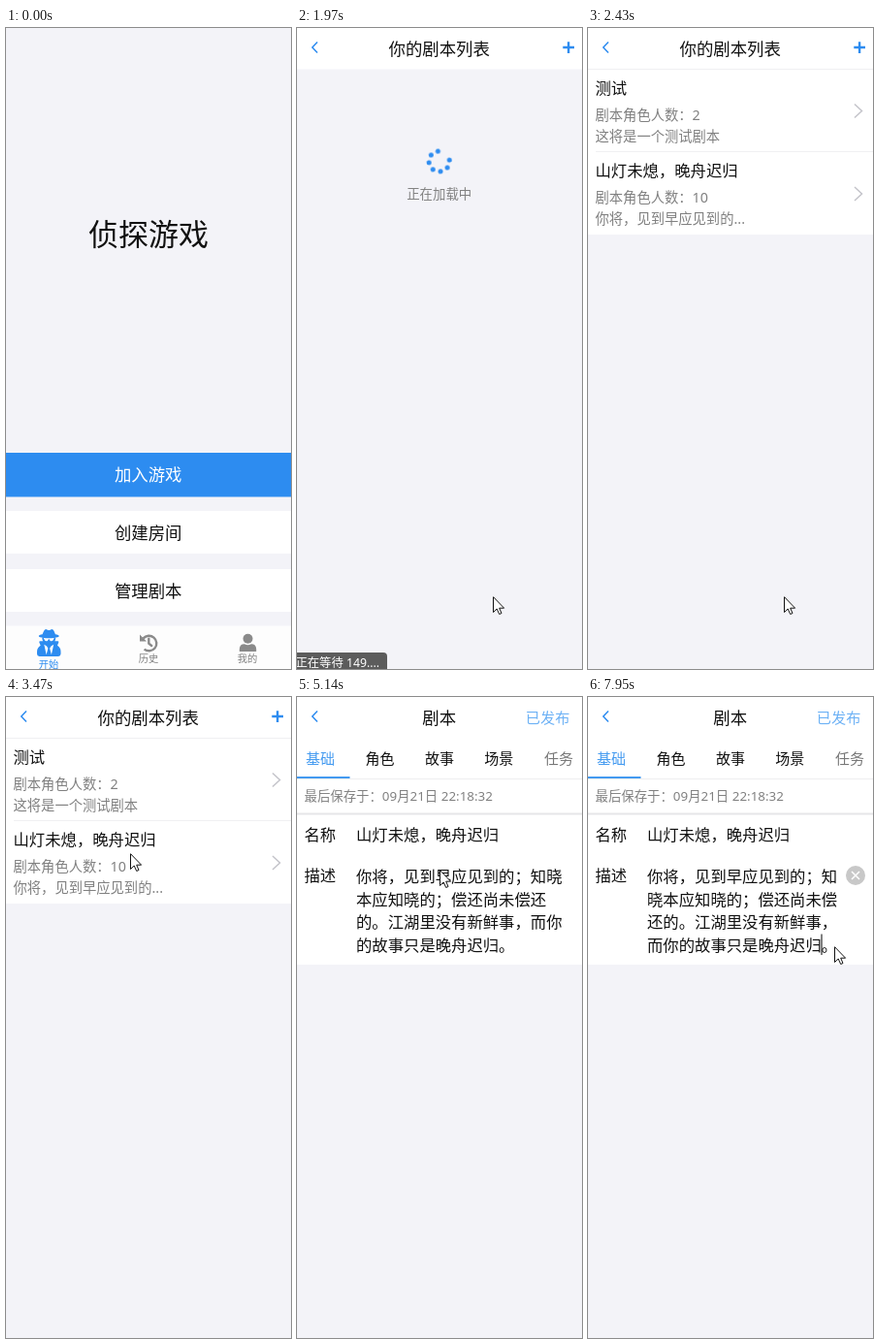
Animation of 294 by 661 pixels, one loop 8 s. Source, as an HTML page:

```html
<!DOCTYPE html>
<html lang="zh-CN">
<head>
<meta charset="utf-8">
<title>侦探游戏</title>
<style>
html, body { margin: 0; width: 100%; height: 100%; overflow: hidden; background: #f3f3f8; }
svg { display: block; }
#stage { width: 294px; height: 661px; }
text { font-family: "Noto Sans", "Noto Sans CJK SC", "Noto Sans CJK", sans-serif; font-size: 16.35px; font-weight: 350; fill: #111; }
.mid { text-anchor: middle; }
.title { font-size: 17.4px; }
.tab { font-size: 15px; }
.note { font-size: 14.3px; fill: #808080; }
.small { font-size: 13.4px; fill: #808080; }
.bar { font-size: 10.3px; fill: #808080; }
.tip { font-size: 12.3px; fill: #fff; }
.blue { fill: #2d8cf0; }
.active { fill: #439af0; }
.white { fill: #fff; }
.grey { fill: #8a8a8a; }
.line { fill: none; stroke-width: 1.5; }

/* screens */
.show { opacity: 0; animation: 8s step-end infinite; }
.home { animation-name: home; }
.list-page { animation-name: list-page; }
.list-load { animation-name: list-load; }
.list { animation-name: list; }
.script-page { animation-name: script-page; }
.script-load { animation-name: script-load; }
.script { animation-name: script; }
.idle { animation-name: idle; }
.editing { animation-name: editing; }
.caret { animation-name: caret; }
@keyframes home { 0% { opacity: 1 } 24.625% { opacity: 0 } }
@keyframes list-page { 24.625% { opacity: 1 } 46.25% { opacity: 0 } }
@keyframes list-load { 24.625% { opacity: 1 } 30.375% { opacity: 0 } }
@keyframes list { 30.375% { opacity: 1 } 46.25% { opacity: 0 } }
@keyframes script-page { 46.25%, 100% { opacity: 1 } }
@keyframes script-load { 46.25% { opacity: 1 } 52.75% { opacity: 0 } }
@keyframes script { 52.75%, 100% { opacity: 1 } }
@keyframes idle { 52.75% { opacity: 1 } 84% { opacity: 0 } }
@keyframes editing { 84%, 100% { opacity: 1 } }
@keyframes caret { 84% { opacity: 1 } 89.75% { opacity: 0 } 95.5%, 100% { opacity: 1 } }

.spin { animation: spin 2s linear infinite -1989ms; }
.script-load .spin { animation-delay: -253ms; }
@keyframes spin { to { transform: rotate(360deg) } }

/* pointer: each move jumps in even steps */
#pointer { animation: move 8s linear infinite; }
@keyframes move {
  0% { transform: translate(236px, 670px) }
  8.624% { transform: translate(236px, 670px) }
  8.625% { transform: translate(236px, 661px); animation-timing-function: steps(5, jump-both) }
  13.125% { transform: translate(202px, 586px) }
  34.125% { transform: translate(202px, 586px); animation-timing-function: steps(6, start) }
  39.675% { transform: translate(106px, 59px); animation-timing-function: steps(4, jump-both) }
  43.375% { transform: translate(128px, 161px) }
  63.5% { transform: translate(128px, 161px); animation-timing-function: steps(5, start) }
  67.96% { transform: translate(223px, 246px); animation-timing-function: steps(2, jump-both) }
  69.75% { transform: translate(223px, 236px) }
  72.625% { transform: translate(223px, 236px); animation-timing-function: steps(1, jump-both) }
  73.625% { transform: translate(246px, 271px) }
  75.375% { transform: translate(246px, 271px); animation-timing-function: steps(4, jump-both) }
  79.125% { transform: translate(247px, 258px) }
  98.375% { transform: translate(247px, 258px); animation-timing-function: steps(1, jump-both) }
  99.375%, 100% { transform: translate(254px, 257px) }
}
</style>
</head>
<body>
<svg id="stage" viewBox="0 0 294 661">
  <defs>
    <path id="back" class="line" stroke="#2d8cf0" d="M21 14.5L15.8 20L21 25.5"/>
    <path id="next" class="line" stroke="#c4c4ca" d="M275 78.5L282.5 85.5L275 92.5"/>
    <g id="dots" class="blue"></g>
  </defs>
  <rect width="294" height="661" fill="#f3f3f8"/>

  <g class="show home">
    <text class="mid" x="147" y="212.5" style="font-size:31px;font-weight:300">侦探游戏</text>
    <rect class="blue" y="438" width="294" height="45.5"/>
    <path class="white" d="M0 498H294V542H0ZM0 558H294V602H0Z"/>
    <text class="mid title white" x="146.7" y="461">加入游戏</text>
    <text class="mid title" x="146.7" y="520.5">创建房间</text>
    <text class="mid title" x="146.7" y="580.5">管理剧本</text>
    <rect y="616.5" width="294" height="45" fill="#fdfdfd"/>
    <g transform="translate(32 620) scale(.0547)">
      <path class="blue" d="M32 128C32 113 60 103 102 95C112 60 130 28 143 12Q160 -8 182 3L210 17Q224 24 238 17L266 3Q290 -6 306 12C320 30 336 60 346 95C390 103 416 113 416 128C416 145 370 155 320 165H128C70 155 32 145 32 128Z"/>
      <path class="blue" d="M96 155H352Q352 195 334 224H393Q412 226 408 246L384 308Q448 350 448 422V467Q446 510 403 512H45Q2 510 0 467V422Q2 345 67 306L42 246Q40 226 56 224H114Q96 195 96 155Z"/>
      <path class="white" d="M128 165Q224 177 320 165V176Q313 181 297 215C280 230 248 230 233 190Q224 178 215 190C200 230 168 230 151 215Q138 195 134 181L128 176Z"/>
      <path class="white" d="M134 288L184 320L208 360L176 480ZM314 288L264 320L240 360L272 480Z"/>
    </g>
    <g fill="none" stroke="#8a8a8a" stroke-width="2.4">
      <path d="M141.6 629.4A7.8 7.8 0 1 1 142.6 640.6"/>
      <path d="M147.3 629.8V634.6L150.2 637" stroke-linecap="round"/>
    </g>
    <path class="grey" d="M138 625.6L145 632.4H138Z"/>
    <circle class="grey" cx="249.5" cy="629.8" r="5"/>
    <path class="grey" d="M240.8 643V640.5Q241 635.4 246 635.3Q249.5 637 253 635.3Q258 635.4 258.2 640.5V643Z"/>
    <text class="mid bar blue" x="44" y="656">开始</text>
    <text class="mid bar" x="147" y="650">历史</text>
    <text class="mid bar" x="249" y="650">我的</text>
  </g>

  <g class="show list-page">
    <rect class="white" width="294" height="42.5"/>
    <use href="#back"/>
    <path class="line" stroke="#2d8cf0" style="stroke-width:2.4" d="M274.3 20H286M280.1 14.2V26"/>
    <text class="mid title" x="146.7" y="21.3">你的剧本列表</text>
  </g>
  <g class="show list-load">
    <g transform="translate(146.7 137.5)"><use href="#dots" class="spin"/></g>
    <text class="mid small" x="146.7" y="171">正在加载中</text>
    <path fill="#5c5c5c" d="M0 644H89Q93 644 93 648V661H0Z"/>
    <text class="tip" x="-1.5" y="655">正在等待 149....</text>
  </g>
  <g class="show list">
    <rect class="white" y="43" width="294" height="170"/>
    <path fill="#f0f0f2" d="M0 42H294V43H0ZM8 127H294V128H8Z"/>
    <text x="7.5" y="62">测试</text>
    <text class="note" x="7.5" y="90">剧本角色人数：2</text>
    <text class="note" x="7.5" y="111.5">这将是一个测试剧本</text>
    <text x="7.5" y="147">山灯未熄，晚舟迟归</text>
    <text class="note" x="7.5" y="175">剧本角色人数：10</text>
    <text class="note" x="7.5" y="197">你将，见到早应见到的...</text>
    <use href="#next"/>
    <use href="#next" y="85.5"/>
  </g>

  <g class="show script-page">
    <rect class="white" width="294" height="42.5"/>
    <use href="#back"/>
    <text class="mid title" x="146.7" y="21.3">剧本</text>
  </g>
  <g class="show script-load">
    <g transform="translate(146.7 137.5)"><use href="#dots" class="spin"/></g>
    <text class="mid small" x="146.7" y="171">正在加载中</text>
    <path fill="#7e7e7e" d="M0 644H89Q93 644 93 648V661H0Z"/>
    <text class="tip" x="-1.5" y="655">正在等待存入...</text>
  </g>
  <g class="show script">
    <rect class="white" y="42" width="294" height="234"/>
    <path fill="#eeeef0" d="M0 84H294V85H0Z"/>
    <path fill="#e6e6e8" d="M0 119.5H294V121.5H0Z"/>
    <rect class="active" y="82" width="54.5" height="2"/>
    <text x="235.8" y="21.5" style="font-size:15.2px;fill:#6cb1f5">已发布</text>
    <text class="mid tab active" x="24" y="63.5">基础</text>
    <text class="mid tab" x="85.5" y="63.5">角色</text>
    <text class="mid tab" x="147" y="63.5">故事</text>
    <text class="mid tab" x="208.3" y="63.5">场景</text>
    <text class="mid tab" x="270" y="63.5" style="fill:#777">任务</text>
    <text class="small" x="7.5" y="102">最后保存于：09月21日 22:18:32</text>
    <text x="7.5" y="142">名称</text>
    <text x="61" y="142">山灯未熄，晚舟迟归</text>
    <text x="7.5" y="184">描述</text>
  </g>
  <g class="show idle">
    <text x="61" y="185">你将，见到早应见到的；知晓</text>
    <text x="61" y="208.7">本应知晓的；偿还尚未偿还</text>
    <text x="61" y="232.3">的。江湖里没有新鲜事，而你</text>
    <text x="61" y="256">的故事只是晚舟迟归。</text>
  </g>
  <g class="show editing">
    <text x="61" y="185">你将，见到早应见到的；知</text>
    <text x="61" y="208.7">晓本应知晓的；偿还尚未偿</text>
    <text x="61" y="232.3">还的。江湖里没有新鲜事，</text>
    <text x="61" y="256">而你的故事只是晚舟迟归。</text>
    <circle cx="276" cy="184" r="10" fill="#c8c8c8"/>
    <path class="line" stroke="#fff" d="M272 180L280 188M280 180L272 188"/>
    <rect class="show caret" x="240.5" y="244.5" width="1" height="21.5"/>
  </g>

  <path id="pointer" d="M.5 .7V16.5L4.2 13L6.7 18.5L9 17.5L6.7 12.2H11.6Z" fill="#fff" stroke="#111" stroke-linejoin="round"/>
</svg>
<script>
// Seven dots on a ring of eight places, the upper right one left open.
const dots = document.getElementById("dots");
for (let i = 0; i < 7; i++) {
  const angle = i * Math.PI / 4;
  const dot = document.createElementNS("http://www.w3.org/2000/svg", "circle");
  dot.setAttribute("cx", 10.6 * Math.cos(angle));
  dot.setAttribute("cy", 10.6 * Math.sin(angle));
  dot.setAttribute("r", 2.5);
  dots.append(dot);
}
// Text y values are glyph centres; shift down to the baseline.
for (const text of document.querySelectorAll("text")) text.setAttribute("dy", ".36em");
</script>
</body>
</html>
```
